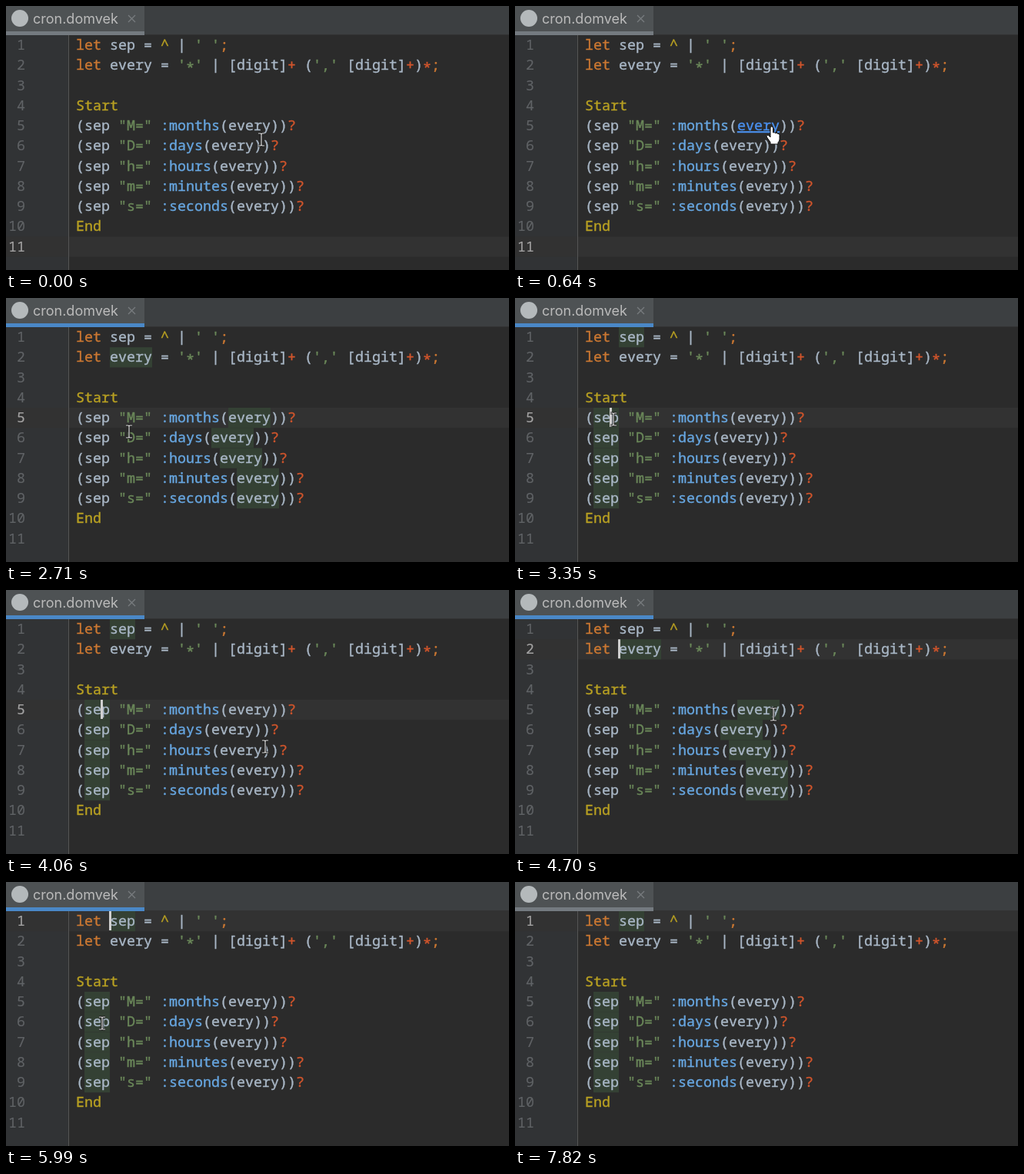
An HTML page for the animation above (7.89 s loop, 654x344 px).

```html
<!DOCTYPE html>
<html lang="en">
<head>
<meta charset="utf-8">
<title>Editor: go to definition</title>
<style>
  html, body { margin: 0; width: 100%; height: 100%; overflow: hidden; background: #2b2b2b; }
  svg { display: block; width: 654px; height: 344px; }
  text { white-space: pre; }
  .code, .num { font: 18.33px "Noto Sans Mono", "DejaVu Sans Mono", monospace; fill: currentColor; stroke: currentColor; }
  .code { stroke-width: .4px; }
  .num { color: #606366; stroke-width: .15px; text-anchor: end; }
  .num.now { color: #a4a3a3; }
  .tab { font: 18px Inter, "Open Sans", sans-serif; fill: #bbbbbb; }
  .key { color: #cc7832; }
  .str { color: #6a8759; }
  .group { color: #67a6e0; }
  .anchor { color: #b8a022; }
  .rep { color: #d0552c; }
  .word, .sign { color: #a9b7c6; }
  .mark { fill: #344134; visibility: hidden; }
  .mark.on { visibility: visible; }
  .link { color: #4a90ee; text-decoration: underline; text-decoration-thickness: 1px; }
</style>
</head>
<body>
<svg viewBox="0 0 654 344">
  <rect width="654" height="344" fill="#2b2b2b"/>
  <rect y="38" width="82" height="306" fill="#313335"/>
  <rect id="row" width="654" height="26.25" fill="#323232"/>
  <rect x="81" y="38" width="1" height="306" fill="#555555"/>
  <rect width="654" height="38" fill="#3c3f41"/>
  <rect y="37" width="654" height="1" fill="#323232"/>
  <rect width="180" height="38" fill="#4e5254"/>
  <rect id="bar" y="33" width="180" height="5"/>
  <circle cx="18" cy="16" r="11" fill="#b4b9bb"/>
  <text class="tab" x="35" y="23">cron.domvek</text>
  <path d="M159 12l9 9m0-9l-9 9" stroke="#777b7e" stroke-width="1.4"/>
  <g id="marks"></g>
  <g id="nums"></g>
  <g id="lines"></g>
  <rect id="caret" width="3" height="25" fill="#d0d0d0"/>
  <g id="mouse">
    <g id="beam" fill="none">
      <path id="bar-shape" d="M-4-8h3l1 1 1-1h3M0-7V7M-4 8h3l1-1 1 1h3" stroke="#1c1c1c" stroke-width="3"/>
      <path d="M-4-8h3l1 1 1-1h3M0-7V7M-4 8h3l1-1 1 1h3" stroke="#dddddd" stroke-width="1.2"/>
    </g>
    <path id="hand" d="M-3 2q0-2 1.7-2T.5 2v6q2-1 3 .7 2-1 3 .8 2.500-.8 2.500 1.800v5q0 3-2 4.500V23H-3v-2.500l-4.500-6.500q-1-2 .5-2.500t2.500 1l1.500 1.500z" fill="#fff" stroke="#111"/>
  </g>
</svg>
<script>
const LOOP = 7890, LEFT = 91, CHAR = 11, ROW = 26.25, BLINK = 500;
const code = `let sep = ^ | ' ';
let every = '*' | [digit]+ (',' [digit]+)*;

Start
(sep "M=" :months(every))?
(sep "D=" :days(every))?
(sep "h=" :hours(every))?
(sep "m=" :minutes(every))?
(sep "s=" :seconds(every))?
End
`.split('\n');

// solid: how long the caret stays lit before it blinks
// link: word shown as a link from linkAt until the next scene
const scenes = [
  { at: 0, row: 11, link: 'every5', linkAt: 210 },
  { at: 1330, row: 5, col: 22, word: 'every', solid: 930 },
  { at: 3090, row: 5, col: 3, word: 'sep', solid: 1540, link: 'every5', linkAt: 4200 },
  { at: 4630, row: 2, col: 4, word: 'every', solid: 1360, link: 'sep6', linkAt: 5640 },
  { at: 5990, row: 1, col: 4, word: 'sep', solid: 820 },
  { at: 7820, row: 1, word: 'sep' }
];
const rest = { x: 332, y: 174 };
const moves = [
  { from: 70, to: 640, x: 335, y: 157 },
  { from: 1740, to: 1950, x: 372, y: 280 },
  { from: 2260, to: 2970, x: 128, y: 158 },
  { from: 3400, to: 3850, x: 340, y: 280 },
  { from: 3920, to: 4270, x: 336, y: 162 },
  { from: 5150, to: 5800, x: 125, y: 184 },
  { from: 6990, to: 7510, x: 545, y: 360 }
];

const $ = id => document.getElementById(id);
const rowTop = row => 38 + (row - 1) * ROW;
const set = (el, attrs) => { for (const k in attrs) el.setAttribute(k, attrs[k]); };
const show = (el, on) => set(el, { visibility: on ? 'visible' : 'hidden' });

const kinds = ['key', 'str', 'group', 'anchor', 'rep', 'word', 'sign'];
const token = /(let\b|;)|('[^']*'|"[^"]*")|(:\w+)|(Start|End|\^)|([+*?])|(\w+)|([^\s\w])/g;
const lowerStar = s => s.replace(/\*(.?)/, '<tspan dy="4">*</tspan><tspan dy="-4">$1</tspan>');

let marks = '', nums = '', lines = '';
code.forEach((line, i) => {
  const row = i + 1, y = rowTop(row), base = y + 19.2;
  nums += `<text class="num" x="25" y="${base}">${row}</text>`;
  for (const m of line.matchAll(token)) {
    const x = LEFT + m.index * CHAR, s = m[0];
    const kind = kinds[m.slice(1).findIndex(Boolean)];
    const named = s === 'sep' || s === 'every';
    if (named) marks += `<rect class="mark ${s}" x="${x}" y="${y}" width="${s.length * CHAR}" height="${ROW}"/>`;
    lines += `<text class="code ${kind}"${named ? ` id="${s + row}"` : ''} x="${x}" y="${base}">${lowerStar(s)}</text>`;
  }
});
$('marks').innerHTML = marks;
$('nums').innerHTML = nums;
$('lines').innerHTML = lines;

const easeOut = k => 1 - (1 - k) ** 2;

function mouseAt(t) {
  let { x, y } = rest;
  for (const m of moves) {
    if (t < m.from) break;
    const k = easeOut(Math.min(1, (t - m.from) / (m.to - m.from)));
    x += (m.x - x) * k;
    y += (m.y - y) * k;
  }
  return [Math.round(x), Math.round(y)];
}

function caretLit({ at, solid }, t) {
  if (!solid) return false;
  const over = t - at - solid;
  return over < 0 || Math.floor(over / BLINK) % 2 === 1;
}

function draw(t) {
  const scene = scenes.findLast(s => s.at <= t);
  const { row, col = 0, word, solid } = scene;
  set($('row'), { y: rowTop(row) });
  set($('bar'), { fill: solid ? '#4a88c7' : '#747a80' });
  set($('caret'), { x: LEFT + col * CHAR - 1, y: rowTop(row) });
  show($('caret'), caretLit(scene, t));
  document.querySelectorAll('.num').forEach((n, i) => n.classList.toggle('now', i + 1 === row));
  document.querySelectorAll('.mark').forEach(m => m.classList.toggle('on', !!word && m.classList.contains(word)));

  const link = t >= scene.linkAt ? scene.link : '';
  document.querySelectorAll('.word').forEach(w => w.classList.toggle('link', !!link && w.id === link));
  show($('hand'), link);
  show($('beam'), !link);
  set($('mouse'), { transform: `translate(${mouseAt(t)})` });
}

const start = performance.now();
function tick() {
  draw((performance.now() - start) % LOOP);
  requestAnimationFrame(tick);
}
tick();
</script>
</body>
</html>
```
